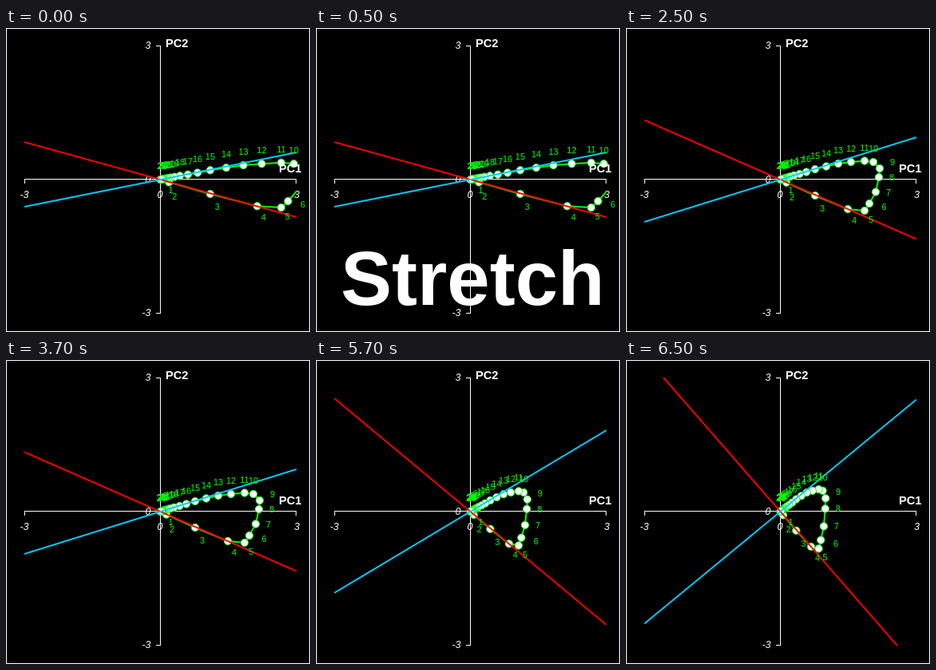
Write an HTML page that moves like this. It is 381 px wide and 381 px high and loops after 8000 ms.

```html
<!DOCTYPE html>
<html lang="en">
<head>
<meta charset="utf-8">
<title>Stretching principal components</title>
<style>
  html, body { margin: 0; width: 100%; height: 100%; overflow: hidden; background: #000; }
  svg { display: block; width: 100vw; height: 100vh; font-family: "Liberation Sans", Arial, sans-serif; }
  .axis { stroke: #fff; stroke-width: 1; fill: none; shape-rendering: crispEdges; }
  .tick { fill: #fff; font-size: 12.5px; font-style: italic; text-anchor: middle; }
  .name { fill: #fff; font-size: 14.67px; font-weight: bold; }
  .num { fill: #0f0; font-size: 11px; text-anchor: middle; }
  .path { stroke: #0f0; stroke-width: 2; fill: none; }
  .dot { fill: #fff; stroke: #0f0; stroke-width: 1; }
  .pc { stroke-width: 2; }
  .title { fill: #fff; font-size: 96px; font-weight: bold; }
</style>
</head>
<body>
<svg id="stage" viewBox="0 0 381 381">
  <clipPath id="plot"><rect x="23" y="22" width="341" height="336"/></clipPath>
  <rect width="381" height="381"/>
  <rect class="axis" x=".5" y=".5" width="380" height="380"/>
  <path class="axis" d="M23 189.5H364M193.5 22V358M23.5 189V195M193.5 189V195M363.5 189V195M188 22.5H194M188 189.5H194M188 357.5H194"/>
  <g id="ticks"></g>
  <g id="scene"></g>
  <text class="name" x="200" y="24">PC2</text>
  <text class="name" x="342" y="181">PC1</text>
  <text class="title" id="title" x="31" y="347">Stretch</text>
</svg>
<script>
const NS = "http://www.w3.org/2000/svg";
const CX = 193.5, CY = 190, HALF = 170.5, EDGE = 364.5, LOOP = 8000;

// start time, x scale, y scale, rise of red and blue at the right edge, title shown
const steps = [
  [0,    1.435, 0.90, 47,    -34,    false],
  [500,  1.435, 0.90, 47,    -34,    true],
  [2500, 1,     1,    74.5,  -53,    false],
  [4500, 0.573, 1.09, 142,   -102,   false],
  [6500, 0.455, 1.19, 195.5, -140.5, false]
];

// the trajectory, relative to the origin
const points = [
  [0, 0], [7.5, 3.7], [43.5, 20], [84.5, 37], [105.5, 39], [111.5, 30],
  [119.5, 15.5], [123.5, -3], [124.5, -14], [116.5, -22], [105.5, -23.5],
  [88.5, -22], [72.5, -20], [57.5, -16.5], [43.5, -13], [32.5, -9.5],
  [24, -7], [17, -5.2]
];
while (points.length < 26) points.push(points[points.length - 1].map(v => v * 0.72));

// label offsets for the first points; the rest sit straight above
const offsets = [[13, 13], [7, 18], [9, 16], [8, 14], [8, 11], [18.5, 4], [16, 0], [16, 0], [16, -8]];

function add(parent, tag, attrs, text) {
  const el = document.createElementNS(NS, tag);
  for (const key in attrs) el.setAttribute(key, attrs[key]);
  if (text !== undefined) el.textContent = text;
  parent.appendChild(el);
  return el;
}

const ticks = document.getElementById("ticks");
const scene = document.getElementById("scene");
const title = document.getElementById("title");

[["3", 178, 26], ["0", 178, 194], ["-3", 176, 361], ["-3", 23, 213], ["0", 193, 213], ["3", 364.5, 213]]
  .forEach(([s, x, y]) => add(ticks, "text", { class: "tick", x, y }, s));

function drawLine(rise, color) {
  add(scene, "line", {
    class: "pc", stroke: color, "clip-path": "url(#plot)",
    x1: CX - HALF, y1: CY - rise, x2: CX + HALF, y2: CY + rise
  });
}

function draw([, sx, sy, red, blue, showTitle]) {
  scene.replaceChildren();
  const placed = points.map(([x, y]) => [CX + x * sx, CY + y * sy]);
  add(scene, "polyline", { class: "path", points: placed.join(" "), "clip-path": "url(#plot)" });
  placed.forEach(([x, y]) => {
    if (x < EDGE) add(scene, "circle", { class: "dot", cx: x, cy: y, r: 4.7 });
  });
  drawLine(red, "#f00");
  drawLine(blue, "#0cf");
  placed.forEach(([x, y], i) => {
    const [dx, dy] = offsets[i] || [0, -17];
    if (x < EDGE) add(scene, "text", { class: "num", x: x + dx, y: y + dy + 4 }, i + 1);
  });
  title.style.display = showTitle ? "" : "none";
}

let shown = null;
function tick() {
  const t = performance.now() % LOOP;
  const step = steps.filter(s => s[0] <= t).pop();
  if (step !== shown) draw(shown = step);
  requestAnimationFrame(tick);
}
tick();
</script>
</body>
</html>
```
